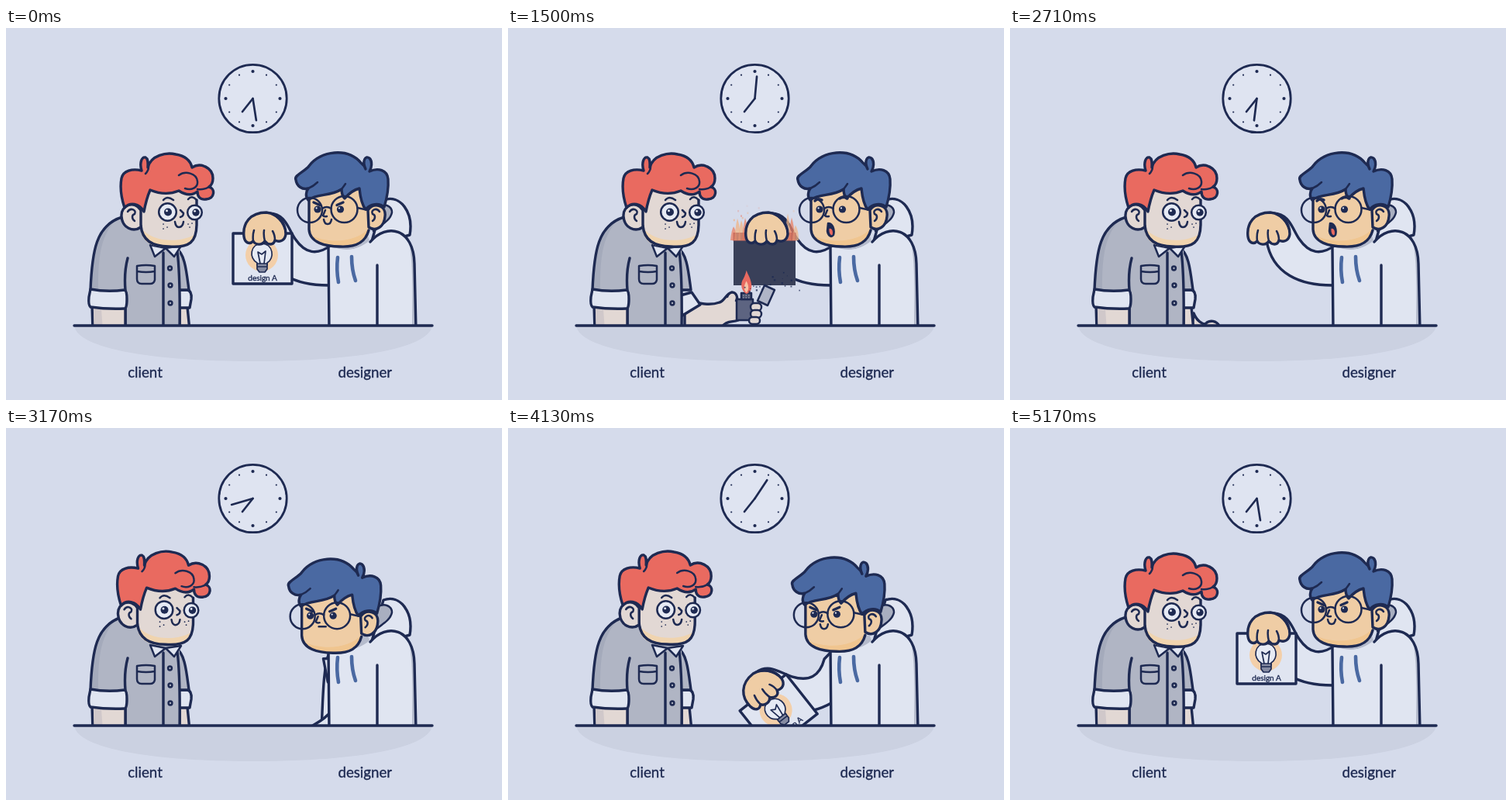
Recreate the animation shown at these times as an HTML page. Size 640 by 480 pixels, loop 5290 ms.

```html
<!DOCTYPE html>
<html lang="en">
<head>
<meta charset="utf-8">
<title>Client and designer</title>
<style>
html, body { margin: 0; width: 100%; height: 100%; overflow: hidden; background: #d5dbeb; }
svg { display: block; width: 100vw; height: 100vh; }
.ln { stroke: #1e2a52; stroke-width: 3.4; stroke-linecap: round; stroke-linejoin: round; }
.thin { stroke-width: 2.5; }
.fine { stroke-width: 1.7; }
.no { fill: none; }
.ink { fill: #1e2a52; }
.red { fill: #e96a60; }
.blue { fill: #4a69a2; }
.hood { fill: #e0e5f1; }
.shirt { fill: #b0b5c4; }
.pale { fill: #e2d8d4; }
.skin { fill: #efcda5; }
text { font-family: Lato, "Open Sans", sans-serif; fill: #1e2a52; stroke: #1e2a52; stroke-width: .35; text-anchor: middle; }
</style>
</head>
<body>
<svg viewBox="0 0 640 480">
  <defs>
    <clipPath id="aboveTable"><rect width="640" height="384"/></clipPath>
    <clipPath id="clientFace"><path d="M174 208V262C177 278 191 283 210 283C237 284 246 276 247 255V205Z"/></clipPath>
    <clipPath id="designerFace"><path d="M390 205V262C393 278 412 283 431 282C453 283 466 276 469 255V205Z"/></clipPath>
  </defs>
  <rect width="640" height="480" fill="#d5dbeb"/>
  <path d="M88 384C92 414 190 430 319 430S546 414 550 384Z" fill="#cbd1e1"/>

  <g id="clock" class="ln">
    <circle cx="318.5" cy="91" r="43.7" fill="#dfe4f1" stroke-width="2.8"/>
    <g id="marks" class="ink" stroke="none"/>
    <path d="M318.5 91L305 108" class="no" stroke-width="2.7"/>
    <path id="minute" d="M318.5 91V62.5" class="no" stroke-width="2.7"/>
  </g>

  <g clip-path="url(#aboveTable)">
    <!-- designer's hood and arm -->
    <path class="ln hood" d="M487 222C509 214 526 238 521 267L470 282Z"/>
    <path class="ln thin" fill="#a9afc0" d="M478 231C489 225 498 230 498 238C496 248 486 253 474 262Z"/>
    <path id="restArm" class="ln hood" d="M417 290C409 310 409 350 407 390H425V290Z"/>
    <g id="arm">
      <path class="ln hood" d="M340 239C361 240 364 259 373 272C386 291 401 294 420 280L450 276V332H420C374 333 338 317 331 274Z"/>
      <g id="paper">
        <path class="ln hood" d="M293 265H369V330H293Z"/>
        <circle cx="330" cy="293" r="21" fill="#f3cfa9"/>
        <path class="ln fine" fill="#e6eaf4" d="M324 303C313 297 315 279 330 278C345 279 347 297 337 303V306H324Z"/>
        <path class="ln no fine" d="M328 304L325 289L330 292L335 288L333 304"/>
        <path class="ln fine" fill="#858ba2" d="M324 304H337V311L334 315H327L324 311ZM324 308H337"/>
        <text x="331" y="325.5" font-size="10">design A</text>
      </g>
      <path id="burnt" fill="#394059"/>
      <g id="fire"/>
      <path class="ln skin" d="M307 269C305 252 315 238 336 238C352 240 361 252 361 266C360 274 354 277 347 274C345 281 338 280 334 275C330 281 322 280 319 275C314 280 308 277 307 269Z"/>
      <path class="ln no thin" d="M319 275Q318 267 320 261M334 275Q332 267 333 261M347 274Q347 267 344 262M343 240C353 245 358 253 360 260"/>
    </g>

    <!-- designer's body -->
    <path class="hood" d="M417 284C440 290 456 283 470 275C491 251 526 258 527 304L529 390H417Z"/>
    <path fill="#b5bbcc" d="M519 272C530 290 528 330 530 390H524C524 345 526 300 519 272ZM419 281C437 290 456 286 469 274L467 268H424Z"/>
    <path class="ln no" d="M416 284L417 390M470 276C491 251 526 258 527 304L529 390M479 306V390"/>
    <path d="M428 296Q426 312 429 328M446 295Q446 312 451 326" fill="none" stroke="#4a69a2" stroke-width="4.6" stroke-linecap="round"/>
    <g id="designerHead">
      <g clip-path="url(#designerFace)">
        <rect class="skin" x="385" y="200" width="90" height="90"/>
        <path d="M390 266C415 279 450 278 469 258V285H390Z" fill="#f0c58f"/>
      </g>
      <path class="ln no" d="M391 216V260C392 277 412 282 431 282C453 283 464 276 468 261"/>
      <path class="ln skin" d="M467 235C475 224 491 229 489 243C488 257 477 263 468 257Z"/>
      <path class="ln no thin" d="M482 237C478 231 470 235 473 240C477 241 477 246 473 249"/>
      <path class="ln blue" d="M374 196C371 190 386 185 391 178C406 158 441 154 458 174C462 177 463 179 464 182C459 171 464 164 469 168C473 172 472 180 469 185C480 180 492 183 493 195C494 208 491 221 488 231C481 225 470 227 464 234C459 228 457 217 456 207C448 209 442 214 437 220C434 217 433 212 433 208C418 218 402 213 390 222C386 218 387 211 390 207C382 209 375 204 374 196Z"/>
      <path class="ln no thin" d="M390 207Q397 204 402 199M433 208Q436 204 438 201"/>
      <g class="ln no thin">
        <circle cx="392" cy="235" r="16"/>
        <circle cx="436.5" cy="234" r="17"/>
        <path d="M408 233Q414 229 419.5 233M453.5 232L467 235"/>
      </g>
      <circle class="ink" cx="402" cy="234" r="4.6"/>
      <circle class="ink" cx="431.5" cy="234" r="4.6"/>
      <circle cx="400.6" cy="232.4" r="1.1" fill="#e6eaf4"/>
      <circle cx="430" cy="232.4" r="1.1" fill="#e6eaf4"/>
      <path class="ln no thin" d="M412 235L409 242Q411 244 414 243"/>
      <path id="brows" class="ln no"/>
      <path id="smile" class="ln no thin" d="M410 247Q411 253 415 253Q419 253 420 247"/>
      <path id="flat" class="ln no thin" d="M413 248H422"/>
      <g id="gasp">
        <path class="ln ink thin" d="M413 252C419 252 422 260 420 267C417 271 413 268 412 262Z"/>
        <path d="M414.5 259C418 258 420 263 418.5 267C416 268 414 264 414.5 259Z" fill="#e96a60"/>
      </g>
    </g>

    <!-- client's far arm -->
    <g id="hump"><path class="ln pale" d="M237 368C241 378 248 382 252 382C257 376 267 377 271 386H235Z"/></g>
    <g id="lowArm">
      <path class="ln pale" d="M224 360H234L237 390H224Z"/>
      <path class="ln hood" d="M222 338H234Q240 339 239 350L237 361H222Z"/>
    </g>
    <g id="highArm">
      <path class="ln pale" d="M228 356L247 355Q262 358 273 354C279 353 281 343 289 341C297 342 295 350 297 354V377C288 381 284 374 270 392H228Z"/>
      <path class="ln hood" d="M219 346L237 341L248 357L225 371Z"/>
      <path class="ln thin" fill="#b0b5c7" d="M331 332L344 338L335 358L322 352Z"/>
      <path class="ln thin" fill="#5d6481" d="M295 350H316V377H295Z"/>
      <path class="ln thin" fill="#4c5470" d="M301 342H314V350H301Z"/>
      <path d="M303 345H313M303 348H313" stroke="#aab0c3" stroke-width="1.2" stroke-dasharray="1.5 2"/>
      <g class="ln pale thin">
        <rect x="313" y="355" width="14" height="10" rx="5"/>
        <rect x="313" y="364" width="14" height="10" rx="5"/>
        <rect x="311" y="373" width="14" height="9" rx="4.5"/>
      </g>
      <path class="ln pale thin" d="M283 347Q286 340 292 342Q297 346 294 352"/>
      <g id="flame">
        <path class="red" d="M0 0C-7 -3 -8 -10 -4 -14C-2 -17 -1 -19 0 -22C2 -18 5 -15 6 -11C8 -5 6 -1 0 0Z"/>
        <path fill="#f6c3a6" d="M0 -1C-4 -4 -3 -8 0 -12C3 -8 4 -4 0 -1Z"/>
      </g>
    </g>

    <!-- client's body -->
    <path class="ln shirt" d="M219 284C231 290 233 316 236 338H221Z"/>
    <path class="shirt" d="M150 244C116 254 111 288 109 340L153 350V390H224V284L190 270Z"/>
    <path fill="#a4aabb" d="M142 247C116 259 111 290 109 338H119C119 302 120 270 142 247Z"/>
    <path class="ln no" d="M150 244C116 254 111 288 109 338M157 297C153 312 153 326 154 338M154 362V390M203 290V390M221 288Q225 320 224 390"/>
    <path class="ln pale" d="M111 358H154V390H112Z"/>
    <path fill="#d0c8ca" d="M113 363H123L125 390H114Z"/>
    <path class="ln hood" d="M109 337Q130 341 153 338Q156 339 156 350Q156 362 153 362Q130 363 109 360Q106 358 107 347Z"/>
    <path class="ln no thin" d="M169 307Q181 305 192 307V325Q191 330 186 330H175Q169 330 169 324ZM169 314Q181 316 192 314"/>
    <g class="ln no thin">
      <circle cx="211.5" cy="310" r="2.4"/><circle cx="212" cy="332" r="2.4"/><circle cx="212" cy="355" r="2.4"/>
    </g>
    <path class="ln hood thin" d="M186 280L192 295L206 284ZM206 284L217 295L226 281Z"/>
    <g id="clientHead">
      <g clip-path="url(#clientFace)">
        <rect class="pale" x="170" y="200" width="80" height="90"/>
        <path d="M174 258C190 278 229 278 247 264V286H174Z" fill="#f0d4af"/>
      </g>
      <path class="ln no" d="M174 255C176 276 191 282 210 282C237 284 246 276 246 253V222"/>
      <path class="ln pale" d="M174 235C166 222 148 228 149 243C150 258 164 264 174 257Z"/>
      <path class="ln no thin" d="M157 237C161 231 169 235 166 240C162 241 162 246 166 249"/>
      <path class="ln red" d="M153 232C148 217 147 205 149 194C151 184 163 181 175 184C172 174 175 166 180 167C184 169 183 175 183 180C187 164 207 160 219 163C231 165 238 171 240 180C251 173 267 180 267 194C267 200 265 203 262 205C270 207 270 220 258 221C250 222 247 217 247 211C238 218 229 214 223 210C211 215 198 214 186 209C183 216 180 226 178 237C172 226 160 224 153 232Z"/>
      <path class="ln no thin" d="M223 190C231 184 246 187 247 198C248 206 239 210 231 207M247 208Q256 209 262 205M184 179Q184 184 180 188"/>
      <g class="ln thin" fill="#e6eaf4">
        <circle cx="208.5" cy="237.5" r="11.3"/><circle cx="243.5" cy="238" r="9.3"/>
      </g>
      <circle class="ink" cx="209" cy="237.5" r="5"/><circle class="ink" cx="245" cy="238" r="4.7"/>
      <circle cx="207.5" cy="235.8" r="1.5" fill="#e6eaf4"/><circle cx="243.6" cy="236.3" r="1.4" fill="#e6eaf4"/>
      <path class="ln no thin" d="M203 222Q208 216 216 222M235 221Q240 215 246 222M225 235L229 239Q229 243 225 244M218 250Q219 257 223 257Q228 257 229 250"/>
      <path class="ln no fine" d="M203 253h.1M208 257h.1M203 259h.1M235 253h.1M240 252h.1M237 257h.1"/>
    </g>
    <g id="ash" class="ink"/>
  </g>

  <path class="ln no" d="M88 384H550"/>
  <text x="179.5" y="451" font-size="18.7">client</text>
  <text x="463.3" y="451" font-size="18.7">designer</text>
</svg>
<script>
const LOOP = 5290;
const $ = id => document.getElementById(id);
const show = (id, on) => $(id).setAttribute("display", on ? "inline" : "none");
const move = (id, value) => $(id).setAttribute("transform", value);
const clamp = v => Math.max(0, Math.min(1, v));
const span = (t, a, b) => clamp((t - a) / (b - a));
const ease = (t, a, b) => { const u = span(t, a, b); return u * u * (3 - 2 * u); };
const pulse = (t, a, b, c, d) => ease(t, a, b) - ease(t, c, d);
const noise = (i, k) => { const s = Math.sin(i * 127.1 + k * 311.7) * 43758.5; return s - Math.floor(s); };

function add(parent, tag, attrs) {
  const node = document.createElementNS("http://www.w3.org/2000/svg", tag);
  for (const key in attrs) node.setAttribute(key, attrs[key]);
  return $(parent).appendChild(node);
}

for (let i = 0; i < 12; i++) {
  const a = i * Math.PI / 6;
  add("marks", "circle", { cx: 318.5 + 35 * Math.sin(a), cy: 91 - 35 * Math.cos(a), r: i % 3 ? 1.1 : 2.1 });
}

const tongues = Array.from({ length: 17 }, (_, i) =>
  add("fire", "path", { fill: i % 3 ? "#efb486" : "#e98063", opacity: .75 }));
const glow = add("fire", "rect", { x: 290, width: 82, height: 11, fill: "#d36a5c", opacity: .5 });
const sparks = Array.from({ length: 14 }, (_, i) =>
  add("fire", "rect", { width: 2, height: 2.5, fill: i % 2 ? "#e9755f" : "#eeb083" }));
const flakes = Array.from({ length: 80 }, (_, i) => {
  const size = .8 + 1.7 * noise(i, 1);
  return add("ash", "rect", { width: size, height: size });
});

const handKeys = [[0, 171], [790, 284], [1500, 365], [2710, 547], [3580, 673], [4380, 790], [5170, 891], [LOOP, 891]];
function minuteAngle(t) {
  const i = handKeys.findIndex(key => key[0] > t);
  const [a, from] = handKeys[i - 1], [b, to] = handKeys[i];
  return from + (to - from) * span(t, a, b);
}

function drawBurn(t) {
  const front = 331 - 67 * span(t, 900, 1480);
  const bottom = 332 - 70 * span(t, 1540, 2080);
  const charred = t > 900 && t < 2080;
  show("paper", t < 1480 || t > 3500);
  show("burnt", charred);
  show("fire", t > 900 && t < 1780);

  let d = `M291 ${front}H371V${bottom}`;
  for (let i = 1; i <= 20; i++) {
    const bite = bottom < 331 ? 9 * noise(i, Math.floor(t / 90)) : 0;
    d += `L${371 - 4 * i} ${Math.max(front, bottom - bite)}`;
  }
  $("burnt").setAttribute("d", d + "Z");

  const heat = span(t, 900, 1050) * (1 - span(t, 1480, 1780));
  const beat = Math.floor(t / 45);
  tongues.forEach((node, i) => {
    const x = 291 + i * 5, h = heat * (8 + 24 * noise(i, beat));
    node.setAttribute("d", `M${x - 4} ${front + 10}Q${x - 3} ${front - h / 3} ${x} ${front - h}Q${x + 4} ${front - h / 3} ${x + 4} ${front + 10}Z`);
  });
  glow.setAttribute("y", front);
  glow.setAttribute("opacity", .5 * heat);
  sparks.forEach((node, i) => {
    const u = (t / 500 + noise(i, 4)) % 1;
    node.setAttribute("x", 290 + 84 * noise(i, 5) + 5 * Math.sin(u * 6 + i));
    node.setAttribute("y", front - 8 - 30 * u);
    node.setAttribute("opacity", heat * (1 - u));
  });

  flakes.forEach((node, i) => {
    const x = 293 + 76 * noise(i, 2), y = 266 + 66 * noise(i, 3);
    const start = 1340 + (332 - y) * 9 + 80 * noise(i, 6);
    const u = (t - start) / 480;
    node.setAttribute("opacity", u > 0 && u < 1 ? .9 - .8 * u : 0);
    node.setAttribute("x", x + 14 * u + 4 * Math.sin(u * 5 + i));
    node.setAttribute("y", y + 22 * u + 26 * u * u);
  });
}

function drawClientArm(t) {
  const raised = pulse(t, 130, 540, 2210, 2740);
  show("lowArm", raised < .12);
  show("highArm", raised >= .12);
  show("hump", raised > .002 && raised < .12);
  move("highArm", `rotate(${58 * (1 - raised)} 228 345)`);
  const lit = span(t, 600, 700) * (1 - span(t, 2080, 2200));
  const tall = .9 + .4 * ease(t, 900, 1400);
  const flicker = 1 + .06 * Math.sin(t / 38);
  show("flame", lit > 0);
  move("flame", `translate(307.5 343) scale(${lit} ${lit * tall * flicker}) skewX(${3 * Math.sin(t / 60)})`);
}

function drawDesigner(t) {
  const lowered = pulse(t, 2750, 3250, 3830, 4350);
  show("arm", lowered < .98);
  show("restArm", lowered > .85);
  move("arm", `rotate(${-100 * lowered} 440 306)`);

  const bow = pulse(t, 2760, 3350, 3830, 4520);
  move("designerHead", `translate(${-12 * bow} ${10.5 * bow})`);
  const shocked = t > 1080 && t < 2950;
  const glum = t >= 2950 && t < 4000;
  show("gasp", shocked);
  show("flat", glum);
  show("smile", !shocked && !glum);
  $("brows").setAttribute("d", shocked
    ? "M396 223Q400 219 405 222M428 220Q433 217 438 220"
    : "M397 225L405 228.5M427 228.5L435 225");
}

function draw(t) {
  move("minute", `rotate(${minuteAngle(t)} 318.5 91)`);
  const lean = pulse(t, 2740, 3250, 4400, 4880);
  move("clientHead", `translate(${-4.8 * lean} ${-3 * lean})`);
  drawClientArm(t);
  drawDesigner(t);
  drawBurn(t);
}

const began = performance.now();
function tick() {
  draw((performance.now() - began) % LOOP);
  requestAnimationFrame(tick);
}
tick();
</script>
</body>
</html>
```
